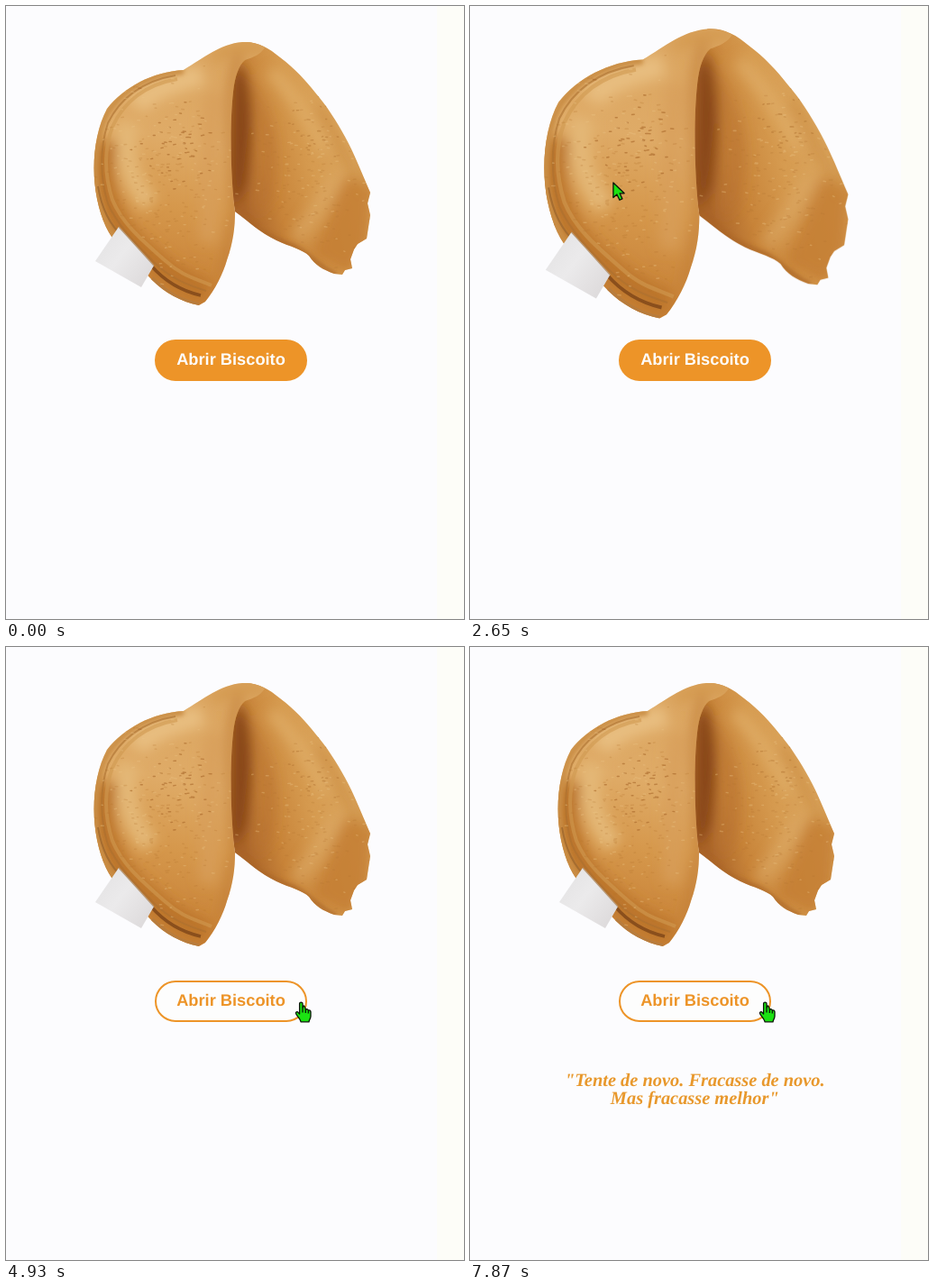
Write an HTML page that moves like this. It is 508 px wide and 680 px high and loops after 8000 ms.

```html
<!DOCTYPE html>
<html lang="pt">
<head>
<meta charset="utf-8">
<title>Biscoito da sorte</title>
<style>
  html, body { margin: 0; width: 100%; height: 100%; overflow: hidden; background: #fcfcfe; }
  svg { display: block; width: 100vw; height: 100vh; }
  text { text-anchor: middle; text-rendering: geometricPrecision; }
  .label { font: bold 18.25px "Liberation Sans", Arial, sans-serif; }
  .quote { font: italic bold 20.4px "Liberation Serif", Times, serif; fill: #e8982c; }
</style>
</head>
<body>
<svg viewBox="0 0 508 680" preserveAspectRatio="none">
  <defs>
    <linearGradient id="rightFill" gradientUnits="userSpaceOnUse" x1="252" y1="175" x2="398" y2="135">
      <stop offset="0" stop-color="#ab652a"/>
      <stop offset=".25" stop-color="#c88439"/>
      <stop offset=".55" stop-color="#d69b50"/>
      <stop offset=".85" stop-color="#dba65f"/>
      <stop offset="1" stop-color="#cf9146"/>
    </linearGradient>
    <linearGradient id="leftFill" gradientUnits="userSpaceOnUse" x1="215" y1="60" x2="165" y2="315">
      <stop offset="0" stop-color="#dba560"/>
      <stop offset=".35" stop-color="#dfab67"/>
      <stop offset=".65" stop-color="#d5974b"/>
      <stop offset="1" stop-color="#c67f34"/>
    </linearGradient>
    <linearGradient id="paperFill" x1="0" y1="0" x2="1" y2=".8">
      <stop offset="0" stop-color="#e2e1e2"/>
      <stop offset=".5" stop-color="#ebeaeb"/>
      <stop offset="1" stop-color="#dddadb"/>
    </linearGradient>
    <filter id="soft" x="-50%" y="-50%" width="200%" height="200%"><feGaussianBlur stdDeviation="7"/></filter>
    <filter id="haze" x="-50%" y="-50%" width="200%" height="200%"><feGaussianBlur stdDeviation="2.5"/></filter>
    <path id="rightShape" d="M262 40C279 39 291 46 304 57C320 69 332 82 343 96C356 111 366 127 376 145C386 163 395 186 404 207L401 219L404 232L400 258L390 264L386 270L382 281L384 291L376 293L373 298L364 297C351 292 343 288 336 277C329 270 315 267 300 260C281 251 268 238 254 228C246 180 244 100 255 60Z"/>
    <path id="leftShape" d="M262 40C238 42 220 57 197 71C162 73 131 90 112 114C98 140 94 180 101 214C106 238 114 255 125 265L162 304C176 318 194 328 214 332L221 328C232 315 241 296 245 282C252 262 254 246 254 228C249 190 248 130 252 95C254 78 258 66 265 60C274 57 282 54 287 46C279 41 271 40 262 40Z"/>
    <clipPath id="rightClip"><use href="#rightShape"/></clipPath>
    <clipPath id="leftClip"><use href="#leftShape"/></clipPath>
  </defs>

  <rect width="508" height="680" fill="#fcfcfe"/>
  <rect x="478" width="30" height="680" fill="#fdfdf8"/>

  <g id="cookie">
    <use href="#rightShape" fill="url(#rightFill)"/>
    <g clip-path="url(#rightClip)">
      <g filter="url(#soft)">
        <path d="M260 60C274 90 276 130 266 200L250 225V80Z" fill="#864514"/>
        <path d="M268 76C296 116 306 160 294 215L276 235C288 170 282 120 268 76Z" fill="#b87230" opacity=".65"/>
        <path d="M376 190L408 200L404 265L380 300L338 276Z" fill="#c27b30" opacity=".8"/>
        <path d="M294 72C322 102 340 130 354 160" fill="none" stroke="#e0ae68" stroke-width="15" opacity=".8"/>
        <path d="M346 112L398 205" stroke="#c68539" stroke-width="9" opacity=".7"/>
        <path d="M322 258C337 238 352 215 366 188" fill="none" stroke="#dba763" stroke-width="15" opacity=".75"/>
      </g>
      <path d="M254 228C281 251 300 260 320 267C336 275 350 292 366 298" fill="none" stroke="#a96526" stroke-width="4" filter="url(#haze)"/>
      <g id="rightGrain"></g>
    </g>

    <use href="#leftShape" fill="url(#leftFill)"/>
    <g clip-path="url(#leftClip)">
      <g filter="url(#soft)">
        <path d="M112 150C100 200 116 240 152 272S190 300 222 318" fill="none" stroke="#bb742b" stroke-width="24"/>
        <path d="M145 112C155 94 190 84 218 76" fill="none" stroke="#e8be80" stroke-width="24"/>
        <path d="M136 130C128 170 142 200 160 220" fill="none" stroke="#e4b877" stroke-width="22"/>
        <path d="M232 95C222 140 228 200 224 262" fill="none" stroke="#d99f5c" stroke-width="20" opacity=".8"/>
        <path d="M260 54C246 82 246 140 254 228L240 300" fill="none" stroke="#c07c35" stroke-width="7"/>
        <path d="M230 58C248 46 270 43 288 48" fill="none" stroke="#d1954a" stroke-width="9"/>
      </g>
      <g fill="none">
        <path d="M197 72C159 75 130 92 113 117C98 143 95 184 102 214S118 254 126 263" stroke="#c98d45" stroke-width="7" filter="url(#haze)"/>
        <path d="M188 77C151 83 126 103 113 130C103 160 105 194 113 219C122 241 144 264 164 284S204 310 222 316" stroke="#ac7030" stroke-width="2" opacity=".6"/>
        <path d="M190 81C151 88 130 108 118 134C108 161 110 190 118 215C130 244 156 264 176 282S210 302 228 310" stroke="#d19a50" stroke-width="4" opacity=".6"/>
        <path d="M161 288C174 303 190 315 216 321" stroke="#8a4f1c" stroke-width="3.5"/>
        <path d="M162 302C178 318 196 328 214 331" stroke="#b87c3c" stroke-width="4"/>
        <path d="M102 200C106 224 116 244 130 256" stroke="#a66d30" stroke-width="2"/>
      </g>
      <g id="leftGrain"></g>
    </g>
    <path d="M125 245L99 283L150 312L164 288L145 267Z" fill="url(#paperFill)"/>
    <path d="M125 245L145 267L164 288" fill="none" stroke="#b99a78" stroke-width="1.2"/>
  </g>

  <rect id="button" x="166" y="371" width="167" height="44" rx="22" stroke="#ed9428" stroke-width="2"/>
  <text id="label" class="label" x="249.5" y="398">Abrir Biscoito</text>
  <text id="line1" class="quote" x="249.3" y="486.5"></text>
  <text id="line2" class="quote" x="249.3" y="506.5"></text>

  <g id="pointer" stroke="#0a1408" stroke-width="1.3" stroke-linejoin="round" fill="#1be212">
    <path id="arrow" d="M0 0V16.5L4 13L7 19.2L10 17.8L7.2 11.8H12.2Z"/>
    <path id="hand" d="M-.4 1.8C-.4-.4 3-.4 3 1.8V7.4C4-.1 6.3 7 6.3 8.3C7.4 7.3 9.3 7.8 9.3 9.2C10.4 8.5 12 9.2 12 10.8V15.5C12 18.2 10.4 19.3 10 21.8H1C.8 19-3.2 15.5-4.4 12.7C-5.1 10.8-3 10-1.8 11.5L-.4 13Z M3 8V11.5M6.3 8.4V12M9.3 9.4V12.5"/>
  </g>
</svg>
<script>
const LOOP = 8000;
const $ = id => document.getElementById(id);
const clamp = v => Math.max(0, Math.min(1, v));
const mix = (a, b, k) => a + (b - a) * k;

// time, x, y of the pointer tip
const track = [
  [930, -14, 214], [1190, 92, 203], [1350, 141, 196], [1650, 157, 196],
  [2690, 159, 196], [2900, 85, 206], [3180, 30, 222], [3440, 30, 236],
  [3560, 50, 255], [3720, 83, 410], [3780, 97, 424], [3920, 220, 468],
  [4080, 335, 460], [4220, 343, 470], [4400, 343, 468], [4620, 326, 394]
];

const quotes = [
  [5050, '"Cada cliente é como se fosse', 'primeiro e único"'],
  [6950, '"Tente de novo. Fracasse de novo.', 'Mas fracasse melhor"']
];

// cubic-bezier(.25, .1, .25, 1)
function ease(x) {
  x = clamp(x);
  const curve = (s, a, b) => 3 * s * (1 - s) ** 2 * a + 3 * s * s * (1 - s) * b + s ** 3;
  let lo = 0, hi = 1;
  for (let i = 0; i < 24; i++) {
    const mid = (lo + hi) / 2;
    if (curve(mid, .25, .25) < x) lo = mid; else hi = mid;
  }
  return curve(lo, .1, 1);
}

function pointerAt(t) {
  const i = track.findIndex(p => p[0] > t);
  if (i < 0) return track[track.length - 1].slice(1);
  if (i === 0) return null;
  const a = track[i - 1], b = track[i];
  const k = (t - a[0]) / (b[0] - a[0]);
  return [mix(a[1], b[1], k), mix(a[2], b[2], k)];
}

let seed = 11;
const rand = () => (seed = seed * 16807 % 2147483647) / 2147483647;
const bell = () => rand() + rand() + rand() - 1.5;

function grain(id, count, x, y, w, h, color, opacity) {
  let d = '';
  for (let i = 0; i < count; i++) {
    const px = x + bell() * w, py = y + bell() * h;
    d += `M${px.toFixed(1)} ${py.toFixed(1)}l${(1 + rand() * 2).toFixed(1)} ${(rand() - .5).toFixed(1)}`;
  }
  $(id).innerHTML += `<path d="${d}" stroke="${color}" stroke-width="1.4" stroke-linecap="round" opacity="${opacity}"/>`;
}
grain('leftGrain', 50, 190, 152, 36, 46, '#a9682a', .6);
grain('leftGrain', 180, 175, 200, 80, 110, '#b4732f', .25);
grain('leftGrain', 120, 180, 190, 80, 110, '#ecc587', .35);
grain('rightGrain', 30, 345, 135, 32, 36, '#b27432', .5);
grain('rightGrain', 120, 335, 200, 65, 90, '#b27432', .25);
grain('rightGrain', 70, 335, 180, 65, 90, '#ecc587', .35);

const tint = (a, b, k) => `rgb(${a.map((v, i) => Math.round(mix(v, b[i], k)))})`;
const orange = [237, 148, 40], white = [253, 253, 253];

function draw(t) {
  const scale = 1 + .1 * (ease((t - 1190) / 1000) - ease((t - 2890) / 1000));
  $('cookie').setAttribute('transform', `translate(250.5 186) scale(${scale}) translate(-250.5 -186)`);

  const hover = ease((t - 4560) / 300);
  $('button').setAttribute('fill', tint(orange, white, hover));
  $('label').setAttribute('fill', tint(white, orange, hover));

  const quote = quotes.filter(q => q[0] <= t).pop() || [0, '', ''];
  $('line1').textContent = quote[1];
  $('line2').textContent = quote[2];

  const pos = pointerAt(t);
  $('pointer').style.display = pos ? '' : 'none';
  if (pos) {
    const over = pos[0] > 165 && pos[0] < 334 && pos[1] > 370 && pos[1] < 416;
    $('pointer').setAttribute('transform', `translate(${pos})`);
    $('arrow').style.display = over ? 'none' : '';
    $('hand').style.display = over ? '' : 'none';
  }
}

function tick() {
  draw(performance.now() % LOOP);
  requestAnimationFrame(tick);
}
tick();
</script>
</body>
</html>
```
